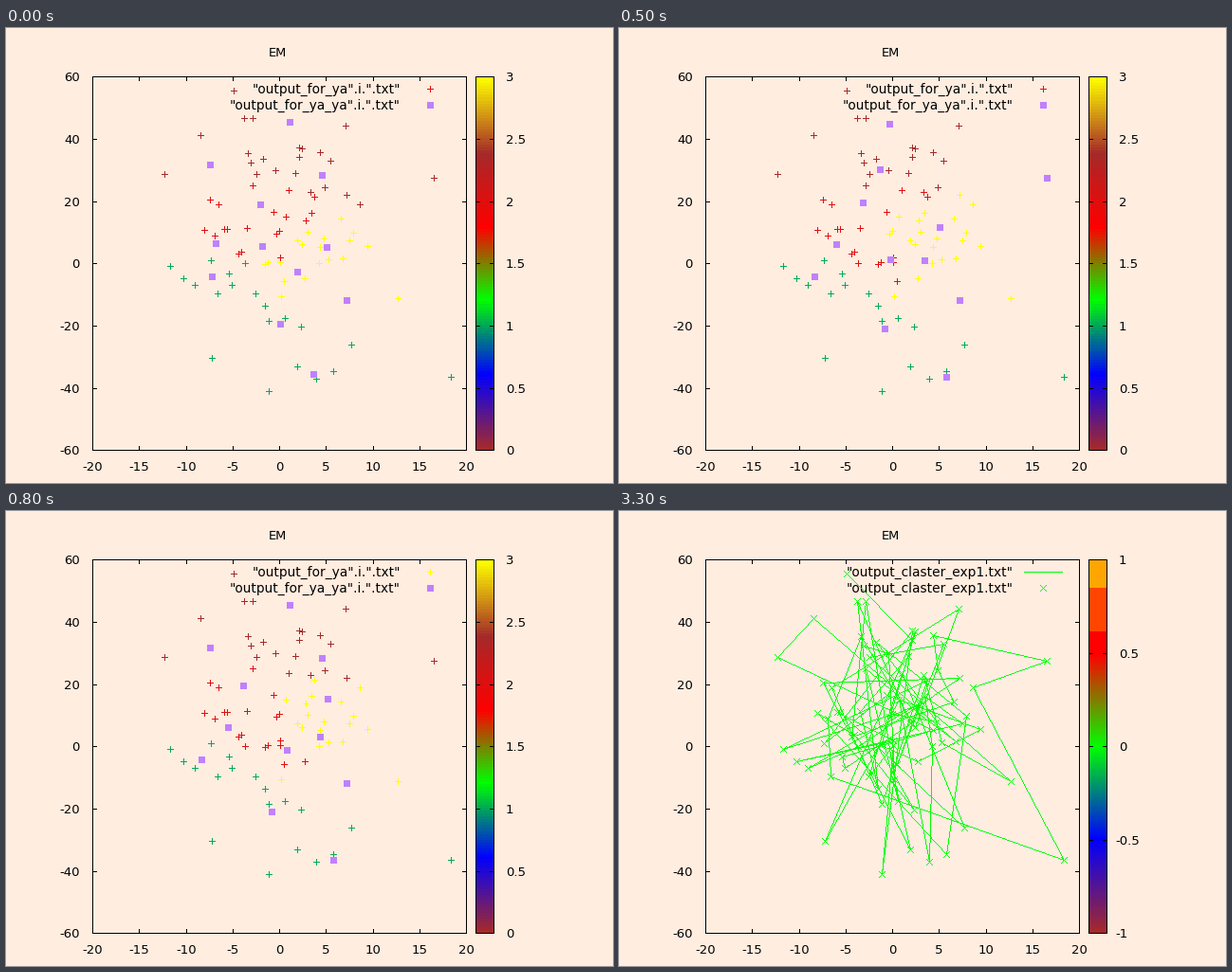
Write a matplotlib script that moves like this. It is 640 by 480 pixels and loops after 3.4 s.

```python
import numpy as np
import matplotlib.pyplot as plt
from matplotlib.animation import FuncAnimation
from matplotlib.collections import PolyCollection
from matplotlib.colors import LinearSegmentedColormap, to_rgb, to_rgba

W, H, DPI = 640, 480, 100
FRAMES, INTERVAL, LAST_STEP = 34, 100, 12
BG, GREEN, PURPLE = "#ffede0", "#00ff00", "#c080ff"
LEFT, RIGHT, TOP, BOTTOM = 91, 485, 51, 445
UNIT = np.array([(RIGHT - LEFT) / 40, (BOTTOM - TOP) / 120])  # px per data unit
KEY_1, KEY_2 = (447, 64), (447, 81)

em_map = LinearSegmentedColormap.from_list(
    "em", ["brown", "blue", "lime", "red", "brown", "yellow"])
path_map = LinearSegmentedColormap.from_list(
    "path", ["brown", "blue", "lime", "red"])
COLORS = em_map(np.linspace(0, 1, 4))  # brown, teal, red, yellow

# Outlying points, in runs that the closing path joins directly
OUTLIERS = [[(240, 66)], [(251, 95)], [(167, 154), (205, 113)], [(260, 95)],
            [(451, 158), (373, 186), (469, 368)], [(358, 103)], [(413, 285)],
            [(173, 251)], [(345, 362)], [(217, 348)], [(381, 230)],
            [(277, 383)], [(364, 334)], [(187, 264)], [(327, 370)],
            [(199, 271)], [(307, 357)]]
INNER = 60

# Three centres for each colour, first and last
START = np.array([(299, 99), (215, 144), (333, 155),
                  (217, 262), (289, 312), (324, 365),
                  (268, 186), (221, 227), (270, 230),
                  (338, 231), (307, 257), (359, 287)])
END = np.array([(285, 101), (275, 149), (451, 158),
                (206, 262), (280, 317), (345, 368),
                (246, 183), (237, 228), (303, 258),
                (339, 190), (337, 233), (359, 287)])
STEPS = np.repeat([1, 3, 10, 10], 3)  # steps each centre needs
RESTART = (7, 8)  # the brown centres fall back here

rng = np.random.default_rng(5)


def scatter():
    """All points in path order: outliers with inner points between them."""
    angle = rng.uniform(0, 2 * np.pi, INNER)
    radius = rng.uniform(0, 1, INNER) ** 0.6
    inner = np.column_stack([287 + 82 * radius * np.cos(angle),
                             215 + 105 * radius * np.sin(angle)])
    parts = []
    for run, gap in zip(OUTLIERS, np.array_split(inner, len(OUTLIERS))):
        parts += [run, gap]
    return np.rint(np.concatenate(parts)).astype(int)


points = scatter()

fig = plt.figure(figsize=(W / DPI, H / DPI), dpi=DPI, facecolor=BG)
ax = fig.add_axes([0, 0, 1, 1])
ax.axis("off")


def rect(x, y, w, h):
    return [(x, y), (x + w, y), (x + w, y + h), (x, y + h)]


def plus(x, y):
    a, b, c, d = -3, 0, 1, 4
    shape = [(b, a), (c, a), (c, b), (d, b), (d, c), (c, c),
             (c, d), (b, d), (b, c), (a, c), (a, b), (b, b)]
    return [(x + u, y + v) for u, v in shape]


def square(x, y):
    return rect(x - 3, y - 3, 7, 7)


def fill(polys, color, z):
    return ax.add_collection(PolyCollection(
        polys, facecolors=color, edgecolors="none", linewidths=0,
        antialiaseds=False, zorder=z))


def label(x, y, s, ha="center", px=13.2):
    return ax.text(x, y, s, ha=ha, va="baseline", color="black", zorder=3,
                   family="DejaVu Sans", size=px * 72 / DPI)


def picture(rgb, extent, z):
    return ax.imshow(rgb, extent=extent, aspect="auto",
                     interpolation="nearest", zorder=z)


def frame(x0, x1):
    w, h = x1 - x0 + 1, BOTTOM - TOP + 1
    return [rect(x0, TOP, w, 1), rect(x0, BOTTOM, w, 1),
            rect(x0, TOP, 1, h), rect(x1, TOP, 1, h)]


def rows(n):
    return np.ceil(np.linspace(BOTTOM, TOP, n) - 1e-6).astype(int)


def colorbar(rgb, names):
    """Colour box with ticks; rgb runs from bottom to top."""
    ys = rows(len(names))
    ticks = [rect(x, y, 5, 1) for y in ys for x in (495, 510)]
    parts = [picture(rgb[::-1, None, :], (496, 514, BOTTOM, TOP + 1), 1),
             fill(ticks, "black", 2)]
    for y, s in zip(ys, names):
        parts.append(label(523 if s[0] == "-" else 527, y + 5, s, "left"))
    return parts


def key(*names):
    return [label(416, 69 + 17 * i, s, "right", 13.75)
            for i, s in enumerate(names)]


def axes_box():
    polys = frame(LEFT, RIGHT) + frame(495, 514)
    xs = np.floor(np.linspace(LEFT, RIGHT, 9) + 0.5).astype(int)
    for x, v in zip(xs, range(-20, 21, 5)):
        polys += [rect(x, TOP, 1, 5), rect(x, BOTTOM - 4, 1, 5)]
        label(x, 467, str(v))
    for y, v in zip(rows(7), range(-60, 61, 20)):
        polys += [rect(LEFT, y, 5, 1), rect(RIGHT - 4, y, 5, 1)]
        label(78, y + 5, str(v), "right")
    fill(polys, "black", 2)
    label(286.5, 30, "EM", px=13)


def closing_path():
    """One-pixel lines through all points, with a cross on each."""
    canvas = np.zeros((H, W, 4))

    def line(p, q):
        n = np.abs(np.subtract(q, p)).max() + 1
        x, y = np.rint(np.linspace(p, q, n)).astype(int).T
        canvas[y, x] = to_rgba(GREEN)

    for p, q in zip(points[:-1], points[1:]):
        line(p, q)
    line((427, 64), (467, 64))
    for x, y in [*points, KEY_2]:
        line((x - 3, y - 3), (x + 3, y + 3))
        line((x - 3, y + 3), (x + 3, y - 3))
    return picture(canvas, (0, W, H, 0), 4)


def centres(step):
    progress = np.minimum(step / STEPS, 1)
    if step in RESTART:
        progress[:3] = 0
    return np.rint(START + (END - START) * progress[:, None]).astype(int)


def clusters(mids):
    """Each point takes the colour of its nearest centre, in data units."""
    gap = (points[:, None] - mids[None]) / UNIT
    return np.hypot(gap[..., 0], gap[..., 1]).argmin(axis=1) // 3


axes_box()

pluses = fill([plus(*p) for p in [*points, KEY_1]], "red", 4)
squares = fill([square(*KEY_2)], PURPLE, 5)
em_parts = [pluses, squares]
em_parts += colorbar(em_map(np.linspace(0, 1, 128))[:, :3],
                     ["0", "0.5", "1", "1.5", "2", "2.5", "3"])
em_parts += key('"output_for_ya".i.".txt"', '"output_for_ya_ya".i.".txt"')

level = np.linspace(-1, 1, BOTTOM - TOP)
path_rgb = path_map((level + 1) / 1.5)[:, :3]
path_rgb[level > 0.62] = to_rgb("#ff4500")
path_rgb[level > 0.855] = to_rgb("#ffa500")
path_parts = [closing_path()]
path_parts += colorbar(path_rgb, ["-1", "-0.5", "0", "0.5", "1"])
path_parts += key(*['"output_claster_exp1.txt"'] * 2)

ax.set_xlim(0, W)
ax.set_ylim(H, 0)


def update(i):
    closing = i == FRAMES - 1
    for part in em_parts:
        part.set_visible(not closing)
    for part in path_parts:
        part.set_visible(closing)
    step = min(i, LAST_STEP)
    mids = centres(step)
    key_color = 2 if step < 7 else 3
    pluses.set_facecolor(COLORS[np.append(clusters(mids), key_color)])
    squares.set_verts([square(*p) for p in [*mids, KEY_2]])
    return em_parts + path_parts


anim = FuncAnimation(fig, update, frames=FRAMES, interval=INTERVAL,
                     repeat=True, repeat_delay=0, blit=False)
plt.show()
```
